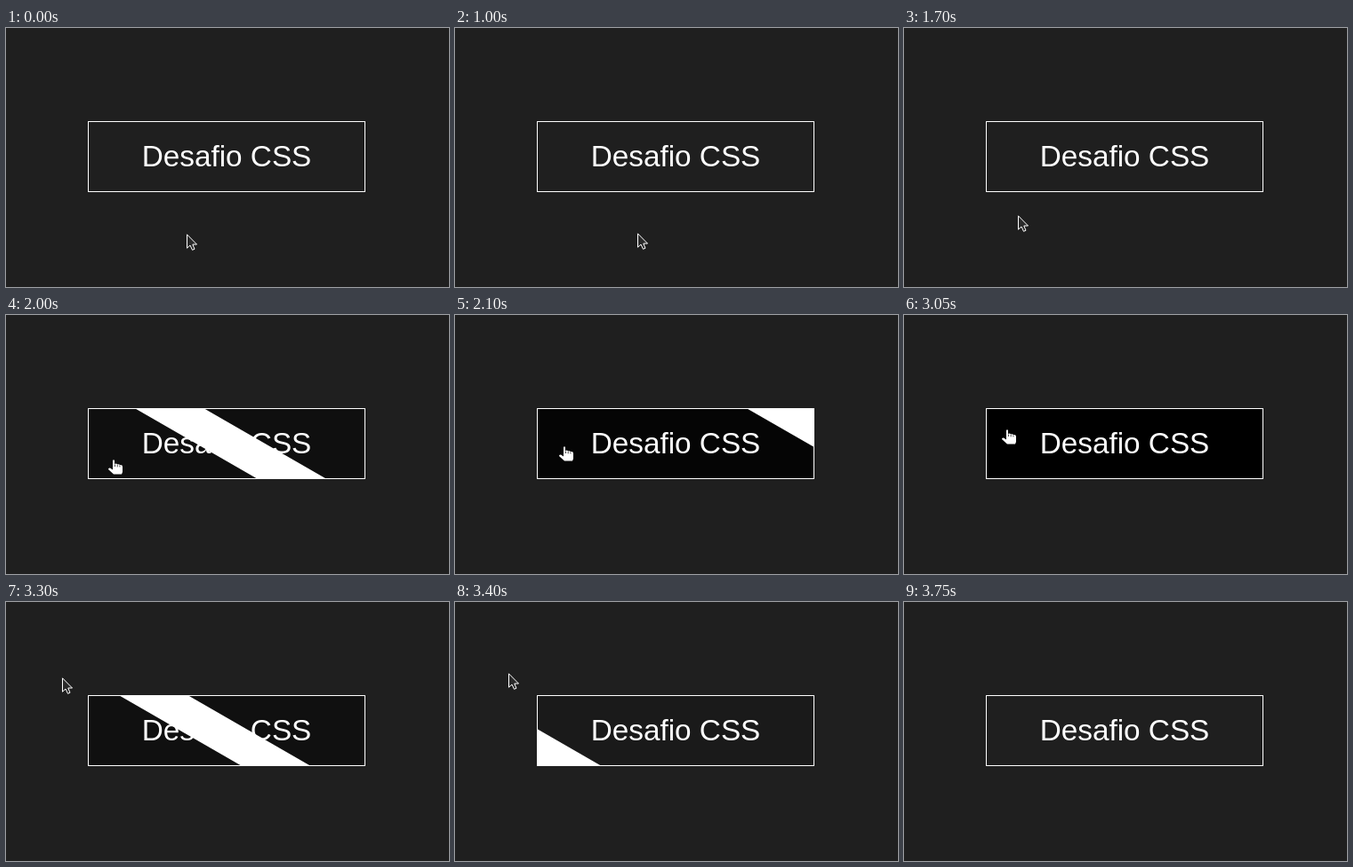
Write an HTML page that moves like this. It is 498 px wide and 292 px high and loops after 4.6 s.

```html
<!DOCTYPE html>
<html lang="pt">
<head>
<meta charset="utf-8">
<title>Desafio CSS</title>
<style>
  html, body { margin: 0; width: 100%; height: 100%; overflow: hidden; background: #1f1f1f; }
  svg { display: block; width: 498px; height: 292px; }
  text { font: 33.3px "Liberation Sans", Arial, sans-serif; fill: #fff; text-anchor: middle; }
</style>
</head>
<body>
<svg viewBox="0 0 498 292">
  <defs>
    <clipPath id="inner"><rect x="93" y="106" width="310" height="78"/></clipPath>
  </defs>
  <rect width="498" height="292" fill="#1f1f1f"/>
  <rect id="fill" x="93" y="106" width="310" height="78" opacity="0"/>
  <text x="248" y="156">Desafio CSS</text>
  <g clip-path="url(#inner)">
    <rect id="stripe" x="-38.75" y="-39" width="77.5" height="78" fill="#fff"/>
  </g>
  <rect x="92.5" y="105.5" width="311" height="79" fill="none" stroke="#fff"/>
  <g id="cursor">
    <path id="arrow" d="M.5 .8V16.2L4 13L6.5 18.3L9 17.2L6.8 12H11.5Z" fill="#2a2a2a" stroke="#fff"/>
    <g id="hand">
      <path d="M-1 1Q0-.6 1 1V5Q3 4 4 5.5Q6 4.7 7 6Q10 5.5 10 8V14L9 16.5H0L-6 11Q-6 9-4 9.5L-1 11.5Z" fill="#fff"/>
      <path d="M1.5 5.5V8M4.2 6V8.4M6.9 6.4V8.4" stroke="#000" stroke-width=".7"/>
    </g>
  </g>
</svg>
<script>
const LOOP = 4600, STEP = 50, FADE = 400;
const HOVER_ON = 1881, HOVER_OFF = 3177.7;

// pointer moves: from time, to time, end x, end y
const START = [203, 232];
const MOVES = [
  [950, 1150, 211, 228],
  [1150, 1500, 141, 219],
  [1550, 1700, 128, 211],
  [1750, 2000, 121, 163],
  [2000, 2100, 123, 148],
  [2100, 2300, 127, 138],
  [3000, 3300, 63, 85],
  [3300, 3500, 56, 75],
  [3550, 3750, 50, -30]
];

const [fill, stripe, cursor, arrow, hand] =
  ["fill", "stripe", "cursor", "arrow", "hand"].map(id => document.getElementById(id));

const clamp = v => Math.min(1, Math.max(0, v));
const lerp = (a, b, k) => a + (b - a) * k;

// CSS "ease": cubic-bezier(.25, .1, .25, 1)
function ease(x) {
  const bez = (s, a, b) => 3 * s * (1 - s) ** 2 * a + 3 * s * s * (1 - s) * b + s ** 3;
  let lo = 0, hi = 1;
  for (let i = 0; i < 24; i++) {
    const mid = (lo + hi) / 2;
    if (bez(mid, .25, .25) < x) lo = mid; else hi = mid;
  }
  return bez(lo, .1, 1);
}

const fade = (t, from) => ease(clamp((t - from) / FADE));

function pointer(t) {
  let [x, y] = START;
  for (const [from, to, endX, endY] of MOVES) {
    const k = clamp((t - from) / (to - from));
    x = lerp(x, endX, k);
    y = lerp(y, endY, k);
  }
  return [Math.round(x), Math.round(y)];
}

function draw(t) {
  const p = fade(t, HOVER_ON) - fade(t, HOVER_OFF);
  const left = 93 + 310 * lerp(-.5, 1.25, p);
  fill.setAttribute("opacity", p);
  stripe.setAttribute("transform", `translate(${left + 38.75} 145) skewX(60)`);

  const [x, y] = pointer(t);
  const over = x >= 92 && x < 404 && y >= 105 && y < 185;
  cursor.setAttribute("transform", `translate(${x} ${y})`);
  arrow.setAttribute("visibility", over ? "hidden" : "visible");
  hand.setAttribute("visibility", over ? "visible" : "hidden");
}

const start = performance.now();
function tick() {
  const t = (performance.now() - start) % LOOP;
  draw(Math.floor(t / STEP) * STEP);
  requestAnimationFrame(tick);
}
tick();
</script>
</body>
</html>
```
